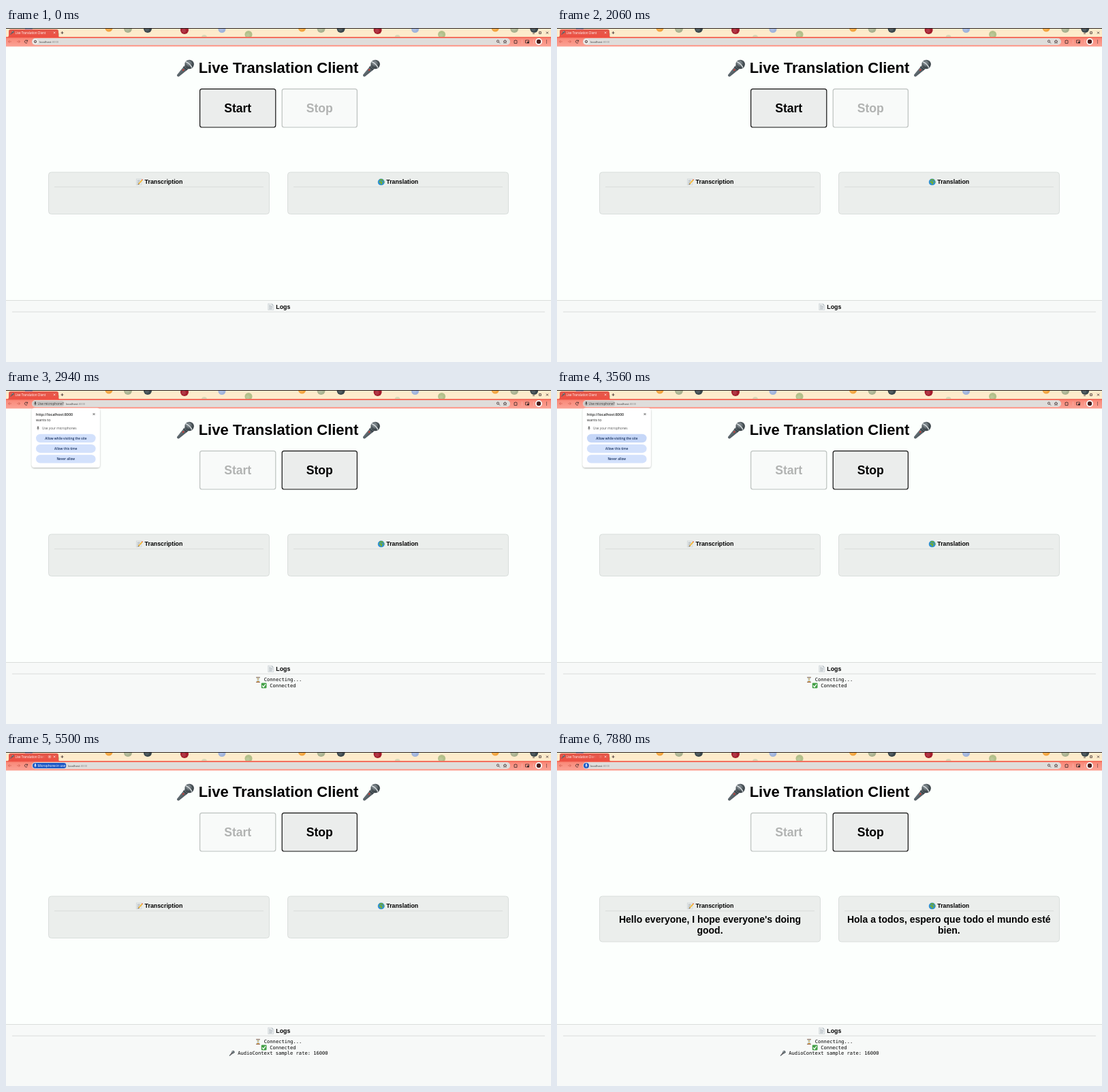
An HTML page for the animation above (8000 ms loop, 800 px wide and 491 px high).

```html
<!DOCTYPE html>
<html lang="en">
<head>
<meta charset="utf-8">
<title>Live Translation Client</title>
<style>
  html, body { margin: 0; width: 100%; height: 100%; overflow: hidden; background: #fcfffd; }
  svg { display: block; width: 800px; height: 491px; }
  text { font-family: "Liberation Sans", Arial, sans-serif; white-space: pre; }
  .b { font-weight: 700; }
  .mid { text-anchor: middle; }
  .ui, .ui text { font-family: "Open Sans", "Noto Sans", sans-serif; }
  .log text { font: 7.1px "DejaVu Sans Mono", monospace; }
  .head { font-size: 8.8px; font-weight: 700; }
  .speech { font-size: 14px; font-weight: 700; text-anchor: middle; }
  .rule { stroke: #d3d7d5; stroke-width: .8; }
  .panel { fill: #ebeeec; stroke: #d4d9d6; stroke-width: .8; }
  .icon { fill: none; stroke: #3b2a2a; stroke-width: .8; }
</style>
</head>
<body>
<svg viewBox="0 0 800 491">
  <defs>
    <linearGradient id="bar" x2="0" y2="1">
      <stop stop-color="#f0614f"/><stop offset=".2" stop-color="#f98b7b"/><stop offset="1" stop-color="#fba396"/>
    </linearGradient>
    <linearGradient id="tabFill" x2="0" y2="1">
      <stop stop-color="#e35a4c"/><stop offset="1" stop-color="#ee4f42"/>
    </linearGradient>
    <linearGradient id="handle" x2="1" y2="1">
      <stop stop-color="#8b9499"/><stop offset=".5" stop-color="#5a656b"/><stop offset="1" stop-color="#2f383d"/>
    </linearGradient>
    <radialGradient id="ball" cx=".4" cy=".35">
      <stop stop-color="#9aa3a8"/><stop offset="1" stop-color="#40494e"/>
    </radialGradient>
    <linearGradient id="fade">
      <stop offset=".8" stop-color="#fff"/><stop offset="1" stop-color="#000"/>
    </linearGradient>
    <mask id="titleFade"><rect x="12" width="46" height="14" fill="url(#fade)"/></mask>
    <clipPath id="strip"><rect y="1" width="800" height="12"/></clipPath>
    <clipPath id="chipClip"><rect id="chipEdge" x="39" y="15" height="10"/></clipPath>
    <filter id="soft" x="-10%" y="-10%" width="120%" height="125%">
      <feDropShadow dx="0" dy="1" stdDeviation="1.2" flood-opacity=".3"/>
    </filter>
    <symbol id="mic" viewBox="0 0 24 24">
      <path d="M11 8.3 15.7 13 3.6 22.8Q2.2 23.4 1.2 22.5 .4 21.5 1.3 20.2Z" fill="url(#handle)"/>
      <path d="M9.2 10.2 13.8 14.6" stroke="#30393e"/>
      <circle cx="17" cy="7" r="6" fill="url(#ball)"/>
      <path d="M12.3 3.8Q18 5.5 20.3 11.6" fill="none" stroke="#cfd5d7" stroke-width="1.5"/>
      <path d="M14 2.4 21.6 9.6M17.5 1.3 22.8 6.8M12 7 16.8 12.2" stroke="#30393e" stroke-width=".4"/>
      <rect x="8.3" y="13" width="2" height="2.4" rx=".8" transform="rotate(45 9 14)" fill="#c63a33"/>
    </symbol>
    <symbol id="memo" viewBox="0 0 24 24">
      <path d="M2 2H19V23H2Z" fill="#eceff0" stroke="#b3bcc0"/>
      <path d="M5 7H15M5 11H14M5 15H11M5 19H14" stroke="#879298" stroke-width="1.5"/>
      <path d="M8 18 20 4 23 7 11 20Z" fill="#f6b72e"/>
      <path d="M20 4 22 2 24 5 23 7Z" fill="#e5453c"/>
      <path d="M8 18 11 20 7 21.5Z" fill="#4a3c32"/>
    </symbol>
    <symbol id="globe" viewBox="0 0 24 24">
      <circle cx="12" cy="12" r="11" fill="#2f91d8"/>
      <path d="M6 4Q12 0 18 4L19 8 14 9 12 6 8 8Z" fill="#63a63a"/>
      <path d="M5 10Q9 7 13 10L17 13 14 20 11 21 10 15 5 14Z" fill="#73ac35"/>
      <path d="M19 9 22 9 22.5 15 20 15Z" fill="#63a63a"/>
    </symbol>
    <symbol id="page" viewBox="0 0 24 24">
      <path d="M3 1H15L21 7V23H3Z" fill="#eef1f2" stroke="#a9b3b8"/>
      <path d="M15 1V7H21Z" fill="#b6c0c5"/>
      <path d="M6 7H12M6 11H18M6 15H18M6 19H16" stroke="#8c989e" stroke-width="1.4"/>
    </symbol>
    <symbol id="sand" viewBox="0 0 24 24">
      <path d="M6 3H18Q18 9 13 12 18 15 18 21H6Q6 15 11 12 6 9 6 3Z" fill="#c6dfe8" stroke="#8faab5"/>
      <path d="M8 7H16L12 12ZM7 21Q8 17 12 16 16 17 17 21Z" fill="#e8a33a"/>
      <path d="M4 2H20M4 22H20" stroke="#8a5a3c" stroke-width="3"/>
    </symbol>
    <symbol id="check" viewBox="0 0 24 24">
      <rect x="1" y="1" width="22" height="22" rx="3" fill="#43a047"/>
      <path d="M5 12 10 18 19 6" fill="none" stroke="#fff" stroke-width="3.4"/>
    </symbol>
  </defs>

  <rect width="800" height="491" fill="#fcfffd"/>

  <!-- browser frame -->
  <g class="ui">
    <rect width="800" height="13" fill="#fdebcb"/>
    <g id="dots" clip-path="url(#strip)"></g>
    <rect width="800" height="1" fill="#2b2524"/>
    <rect y="13" width="800" height="14.5" fill="url(#bar)"/>
    <rect y="27" width="800" height="1" fill="#fde3dd"/>
    <path d="M1 14Q4 14 4 10V5Q4 2 7 2H74Q77 2 77 5V10Q77 14 80 14Z" fill="url(#tabFill)"/>
    <use href="#mic" x="6" y="4" width="6" height="6"/>
    <text id="tabTitle" x="13.5" y="8.6" font-size="4.4" fill="#fff">Live Translation Client</text>
    <g id="rec">
      <circle cx="64" cy="7" r="2" fill="none" stroke="#ffd2c8" stroke-width=".5"/>
      <circle cx="64" cy="7" r="1" fill="#ffd2c8"/>
    </g>
    <path d="M69.8 5.6 72.4 8.2M72.4 5.6 69.8 8.2" stroke="#fff" stroke-width=".6"/>
    <path class="icon" d="M80.5 7H84.5M82.5 5V9M773 8.2H776M793 5.5 796 8.5M796 5.5 793 8.5"/>
    <rect class="icon" x="782.7" y="5.7" width="2.6" height="2.6"/>
    <path d="M8 20H3.5M5.5 18 3.5 20 5.5 22M16 20H20.5M18.5 18 20.5 20 18.5 22" fill="none" stroke="#d25c50" stroke-width=".7"/>
    <path class="icon" d="M31.2 18.8A2.1 2.1 0 1 0 31.4 21M31.6 17.6V19.3H29.8" stroke-width=".7"/>
    <rect x="38" y="15" width="702" height="10" rx="5" fill="#dfdddb"/>
    <g id="info">
      <circle cx="43" cy="20" r="3.8" fill="#f4f3f2"/>
      <circle class="icon" cx="43" cy="20" r="1.8" stroke-width=".5"/>
      <path class="icon" d="M43 19.7V21M43 18.8V19.2" stroke-width=".5"/>
    </g>
    <g clip-path="url(#chipClip)">
      <rect id="chip" x="39" y="16" height="8" rx="4"/>
      <g id="chipMic" fill="none" stroke-width=".6">
        <path d="M43 17.8V20.2" stroke-width="1.5" stroke-linecap="round"/>
        <path d="M41.3 20Q43 22.6 44.7 20M43 21.3V22.6"/>
      </g>
      <text id="chipText" x="46.5" y="21.8" font-size="4.7" font-weight="500"></text>
    </g>
    <text id="url" y="21.6" font-size="4.2" fill="#333">localhost<tspan fill="#888">:8000</tspan></text>
    <g class="icon" stroke-width=".7">
      <circle cx="722" cy="19.5" r="1.6"/><path d="M723.2 20.7 725 22.5"/>
      <path d="M732.5 17.6 733.2 19.2 735 19.4 733.7 20.6 734.1 22.3 732.5 21.4 730.9 22.3 731.3 20.6 730 19.4 731.8 19.2Z"/>
      <path d="M746 18.5H747.4Q748 16.6 748.8 18.5H750V22.5H746Z"/>
      <path d="M762.5 18H767.5V22H762.5Z"/>
    </g>
    <path d="M765 20H768V22.4H765Z" fill="#3b2a2a"/>
    <path d="M757.5 17V23M774.5 17V23" stroke="#f4c4bb" stroke-width=".5"/>
    <circle cx="782" cy="20" r="5" fill="#fff"/>
    <circle cx="782" cy="20" r="3.2" fill="#4a1f1d"/>
    <path d="M793.5 17.6V22.6" stroke="#3b2a2a" stroke-width="1" stroke-dasharray="1 1"/>
  </g>

  <!-- page -->
  <use href="#mic" x="250" y="45.5" width="27" height="27"/>
  <text class="b mid" x="400" y="66.2" font-size="22">Live Translation Client</text>
  <use href="#mic" x="523" y="45.5" width="27" height="27"/>
  <g id="start">
    <rect x="284.6" y="89.6" width="111.2" height="56.4" rx="3"/>
    <text class="b mid" x="340.2" y="124" font-size="17.6">Start</text>
  </g>
  <g id="stop">
    <rect x="405.2" y="89.6" width="110.2" height="56.4" rx="3"/>
    <text class="b mid" x="460.3" y="124" font-size="17.6">Stop</text>
  </g>

  <rect class="panel" x="62.5" y="212" width="324" rx="4"/>
  <rect class="panel" x="413.5" y="212" width="324" rx="4"/>
  <path class="rule" d="M71 233.7H378M422 233.7H729"/>
  <use href="#memo" x="190.5" y="221" width="10.5" height="10.5"/>
  <text class="head" x="203.6" y="229.2">Transcription</text>
  <use href="#globe" x="545.3" y="221" width="10.8" height="10.8"/>
  <text class="head" x="558.3" y="229.2">Translation</text>
  <g id="heard"><text class="speech" x="224.5" y="251.2"></text><text class="speech" x="224.5" y="267.2"></text></g>
  <g id="said"><text class="speech" x="575.3" y="251.2"></text><text class="speech" x="575.3" y="267.2"></text></g>

  <rect y="400" width="800" height="91" fill="#f7f9f8"/>
  <path class="rule" d="M0 400.5H800M9 417.3H791"/>
  <use href="#page" x="383.5" y="404.6" width="10.5" height="10.5"/>
  <text class="head" x="396.3" y="412.8">Logs</text>
  <g class="log">
    <g id="log1"><use href="#sand" x="365.7" y="421.6" width="8.6" height="8.6"/><text x="378.8" y="428.4">Connecting...</text></g>
    <g id="log2"><use href="#check" x="374.3" y="430.2" width="8.6" height="8.6"/><text x="387.2" y="436.9">Connected</text></g>
    <g id="log3"><use href="#mic" x="327.3" y="438.7" width="8.6" height="8.6"/><text x="340.2" y="445.3">AudioContext sample rate: 16000</text></g>
  </g>

  <!-- permission prompt -->
  <g id="prompt" class="ui">
    <rect x="37.8" y="26.5" width="100" height="87.5" rx="4" fill="#fff" filter="url(#soft)"/>
    <g font-size="5.4" font-weight="600" fill="#222">
      <text x="44" y="38">http://localhost:8000</text>
      <text x="44" y="45.6" font-weight="500">wants to</text>
    </g>
    <path d="M127.5 34 130.5 37M130.5 34 127.5 37" stroke="#333" stroke-width=".7"/>
    <path d="M47 54V56.3" stroke="#555" stroke-width="1.5" stroke-linecap="round"/>
    <path d="M45.2 56Q47 58.8 48.8 56M47 57.5V59" fill="none" stroke="#555" stroke-width=".6"/>
    <text x="53" y="58" font-size="4.8" fill="#555">Use your microphones</text>
    <g id="choices"></g>
  </g>
</svg>
<script>
const LOOP = 8000;
const $ = id => document.getElementById(id);
const show = (id, on) => { $(id).style.opacity = +on; };
const set = (el, attrs) => { for (const k in attrs) el.setAttribute(k, attrs[k]); };
const ease = (t, from, to) => {
  const p = Math.min(1, Math.max(0, (t - from) / (to - from)));
  return p * p * (3 - 2 * p);
};
const mix = (a, b, p) => a + (b - a) * p;

// theme pattern: x, y, radius, colour
const balls = [
  [151, 0, 5.5, '#f5a33a'], [179, 1, 6, '#a9b18e'], [208, 1, 6, '#39464b'], [262, 3, 6, '#a51d2c'],
  [291, 14, 4, '#d9d8b6'], [317, 1.5, 5.5, '#9fb3dc'], [356, 9.5, 5.5, '#b3c08a']
];
let dots = '';
for (let i = -1; i < 3; i++)
  for (const [x, y, r, c] of balls) {
    const cx = x + i * 283.6;
    dots += `<circle cx="${cx}" cy="${y}" r="${r}" fill="${c}"/>` +
      `<circle cx="${cx - 1}" cy="${y + 1}" r="${r * .5}" fill="#fff" opacity=".12"/>`;
  }
$('dots').innerHTML = dots;

$('choices').innerHTML = ['Allow while visiting the site', 'Allow this time', 'Never allow'].map((s, i) =>
  `<rect x="44" y="${64.8 + i * 15.2}" width="87.6" height="12.4" rx="6.2" fill="#d3e1fc"/>` +
  `<text class="mid" x="87.8" y="${72.6 + i * 15.2}" font-size="4.7" font-weight="600" fill="#17305f">${s}</text>`
).join('');

// time, first line, second line
const heard = [[0, '', ''], [6190, 'Hello everyone.', ''], [7060, 'Hello everyone, I hope everyone', ''],
  [7750, "Hello everyone, I hope everyone's doing", 'good.']];
const said = [[0, '', ''], [6190, 'Hola a todos.', ''], [7130, 'Hola a todos, espero que todos', ''],
  [7880, 'Hola a todos, espero que todo el mundo esté', 'bien.']];

function speak(id, steps, t) {
  const step = steps.filter(s => s[0] <= t).pop();
  [...$(id).children].forEach((line, i) => {
    if (line.textContent !== step[i + 1]) line.textContent = step[i + 1];
  });
}

function button(id, on) {
  const [box, label] = $(id).children;
  set(box, { fill: on ? '#ebedec' : '#f8faf9', stroke: on ? '#111' : '#bcc1bf', 'stroke-width': 1.2 });
  set(label, { fill: on ? '#000' : '#b1b3b2' });
}

function addressBar(t) {
  const asking = t < 3620;
  const open = asking ? ease(t, 2500, 2800) : 1 - ease(t, 6540, 6750);
  const width = mix(8, asking ? 46.5 : 49.5, open);
  const ink = asking ? '#333' : '#fff';
  show('chip', t >= 2500);
  show('chipMic', t >= 2500);
  show('info', t < 2500);
  set($('chipEdge'), { width });
  set($('chip'), { width, fill: asking ? '#c9c7c5' : '#1b57c5' });
  set($('chipMic'), { stroke: ink });
  set($('chipText'), { fill: ink, opacity: open });
  $('chipText').textContent = asking ? 'Use microphone?' : 'Microphone in use';
  set($('url'), { x: mix(49, asking ? 88 : 91, open) });
}

function render(t) {
  const live = t >= 2250;
  button('start', !live);
  button('stop', live);
  show('log1', live);
  show('log2', t >= 2440);
  show('log3', t >= 3750);
  addressBar(t);

  show('prompt', ease(t, 2500, 2640) * (1 - ease(t, 3560, 3700)));
  set($('choices').firstChild, { fill: t >= 3120 ? '#c6d7f8' : '#d3e1fc' });

  const recording = t >= 3750;
  show('rec', recording ? .6 + .4 * Math.cos((t - 4000) * Math.PI / 750) : 0);
  $('tabTitle').setAttribute('mask', recording ? 'url(#titleFade)' : 'none');

  speak('heard', heard, t);
  speak('said', said, t);
  const height = t >= 7750 ? 67 : 61.5;
  document.querySelectorAll('.panel').forEach(p => set(p, { height }));
}

const begin = performance.now();
function tick() {
  render((performance.now() - begin) % LOOP);
  requestAnimationFrame(tick);
}
tick();
</script>
</body>
</html>
```
